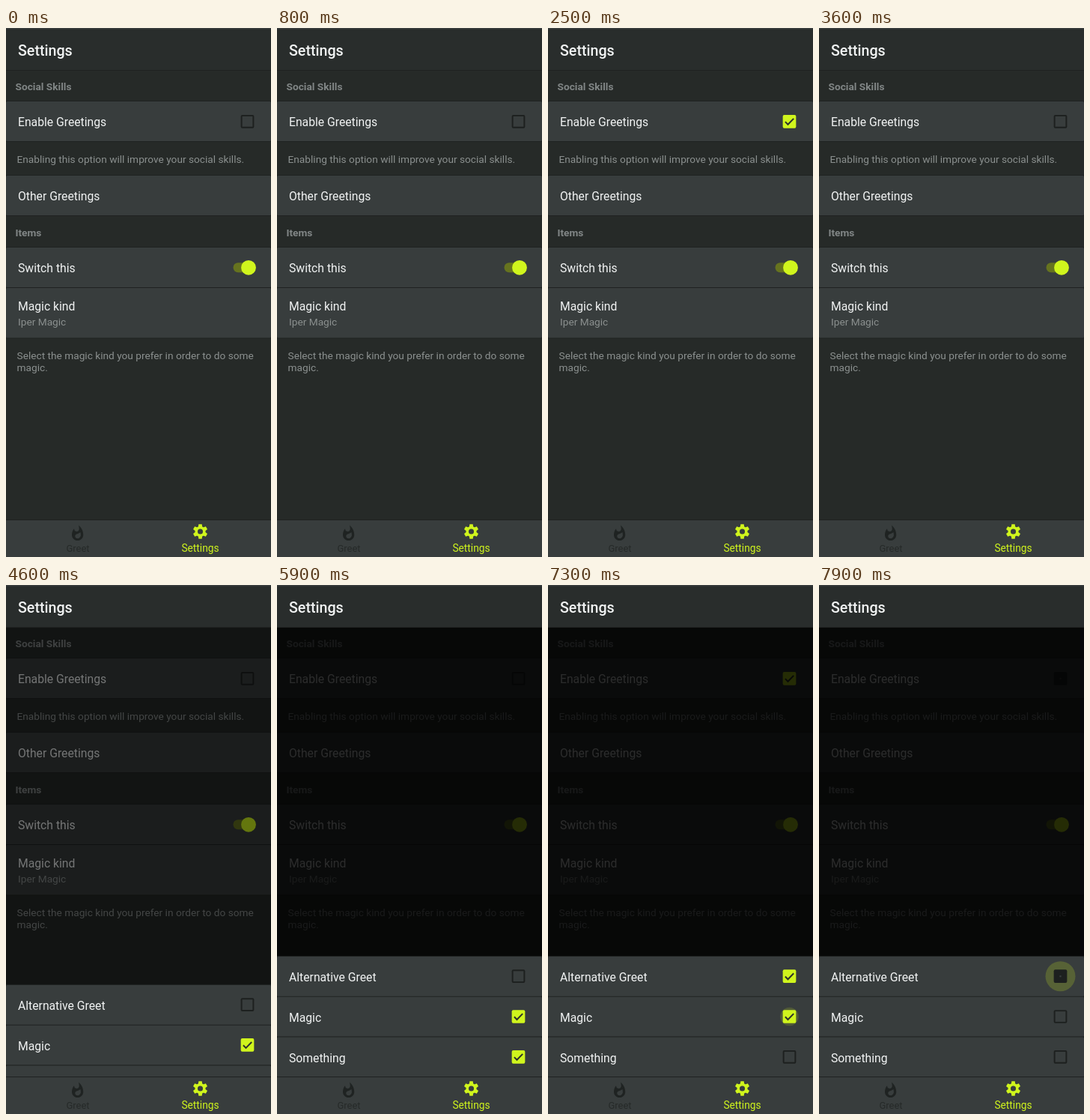
Recreate the animation shown at these times as an HTML page. Size 354 px wide and 706 px high, loop 8000 ms.

```html
<!DOCTYPE html>
<html lang="en">
<head>
<meta charset="utf-8">
<title>Settings</title>
<style>
  html, body { margin: 0; width: 100%; height: 100%; overflow: hidden; background: #262a28; }
  svg { display: block; width: 354px; height: 706px; }
  text { font: 15.73px Roboto, sans-serif; fill: #f1f3f3; }
  .title { font-size: 19.66px; font-weight: 500; }
  .section { font-size: 13.7px; font-weight: 700; fill: #818686; }
  .note { font-size: 13.7px; fill: #8b908f; }
  .tab { font-size: 13.76px; text-anchor: middle; }
  .row { fill: #383d3d; }
  .edge { fill: #1f2221; }
</style>
</head>
<body>
<svg viewBox="0 0 354 706">
  <rect width="354" height="706" fill="#262a28"/>
  <g id="page">
    <text class="section" x="12.5" y="82.5">Social Skills</text>
    <text class="note" x="14.5" y="180">Enabling this option will improve your social skills.</text>
    <text class="section" x="12.5" y="277.5">Items</text>
    <text class="note" x="14.5" y="442">Select the magic kind you prefer in order to do some</text>
    <text class="note" x="14.5" y="458">magic.</text>
  </g>
  <rect id="shade" y="57" width="354" height="600"/>
  <g id="sheet"></g>
  <rect width="354" height="57" fill="#292d2c"/>
  <rect width="354" height="1.5" fill="#3a3f3f"/>
  <rect class="edge" y="56" width="354" height="1"/>
  <text class="title" x="16" y="36.7">Settings</text>
  <rect class="row" y="657" width="354" height="49"/>
  <rect class="edge" y="656" width="354" height="1"/>
  <path transform="translate(84.2 663.2) scale(.95)" fill="#1f2322" fill-rule="evenodd"
    d="M13.5.67s.74 2.65.74 4.8c0 2.06-1.35 3.73-3.41 3.73-2.07 0-3.63-1.67-3.63-3.73l.03-.36C5.21 7.51 4 10.62 4 14c0 4.42 3.58 8 8 8s8-3.58 8-8C20 8.61 17.41 3.8 13.5.67zM11.71 19c-1.78 0-3.22-1.4-3.22-3.14 0-1.62 1.05-2.76 2.81-3.12 1.77-.36 3.6-1.21 4.62-2.58.39 1.29.59 2.65.59 4.04 0 2.65-2.15 4.8-4.8 4.8z"/>
  <text class="tab" x="96" y="699" style="fill:#262a29;font-size:13px">Greet</text>
  <g id="gear" transform="translate(259.5 672) scale(.983)" fill="#d0f51d"></g>
  <text class="tab" x="259.5" y="699" style="fill:#d0f51d">Settings</text>
</svg>
<script>
const LOOP = 8000, LIME = [208, 245, 29], DARK = [29, 32, 31];
const $ = id => document.getElementById(id);
const page = $('page'), sheet = $('sheet'), shade = $('shade');
const clamp = v => Math.max(0, Math.min(1, v));
const span = (t, from, length) => clamp((t - from) / length);
const easeOut = (p, power) => 1 - (1 - p) ** power;

function add(parent, tag, attrs, content) {
  const node = document.createElementNS('http://www.w3.org/2000/svg', tag);
  set(node, attrs);
  if (content) node.textContent = content;
  return parent.appendChild(node);
}
function set(node, attrs) {
  for (const key in attrs) node.setAttribute(key, attrs[key]);
}

function addRow(parent, y, height, label, detail) {
  add(parent, 'rect', { class: 'edge', y: y - 1, width: 354, height: height + 2 });
  add(parent, 'rect', { class: 'row', y, width: 354, height, rx: 1.5 });
  add(parent, 'text', { x: 16, y: y + (detail ? 30 : 33) }, label);
  if (detail) add(parent, 'text', { class: 'note', x: 16, y: y + 49.5 }, detail);
}

// flips: times at which the box toggles; a tap also shows a ripple
function addBox(parent, y, checked, flips, tapped = true) {
  const g = add(parent, 'g', { transform: `translate(322.5 ${y})` });
  const ripple = add(g, 'circle', { fill: '#d0f51d' });
  const frame = add(g, 'rect', { x: -8.85, y: -8.85, width: 17.7, height: 17.7, rx: 2 });
  const hole = add(g, 'rect', { class: 'row' });
  const tick = add(g, 'path', { d: 'M-5.6 .3L-2 4L5.7 -3.9', fill: 'none', stroke: '#2d322b', 'stroke-width': 2 });

  return t => {
    let on = checked, last = -1e4;
    for (const flip of flips) if (t >= flip) { on = !on; last = flip; }
    const p = span(t, last, 300), amount = on ? p : 1 - p;
    const tint = clamp((amount - .6) / .25), mark = clamp((amount - .65) / .35);
    const size = 13.8 * clamp((.58 - amount) / .58) ** .95;
    const mix = LIME.map((c, i) => Math.round(DARK[i] + (c - DARK[i]) * tint));
    frame.setAttribute('fill', `rgb(${mix})`);
    set(hole, { x: -size / 2, y: -size / 2, width: size, height: size });
    set(tick, { transform: `scale(${mark})`, opacity: mark });
    const next = flips.find(f => t >= f - 70 && t < f + 430);
    const age = tapped && next !== undefined ? t - next + 70 : -1;
    set(ripple, {
      r: 6 + 14 * easeOut(clamp(age / 200), 2),
      opacity: age < 0 ? 0 : .2 * clamp(age / 60) * (1 - span(age, 260, 200))
    });
  };
}

addRow(page, 98, 53, 'Enable Greetings');
addRow(page, 197, 53, 'Other Greetings');
addRow(page, 293, 53, 'Switch this');
addRow(page, 347, 66.5, 'Magic kind', 'Iper Magic');
add(page, 'rect', { x: 303.5, y: 313.2, width: 30, height: 13, rx: 6.5, fill: '#66731f' });
add(page, 'circle', { cx: 324, cy: 319.8, r: 9.9, fill: '#d0f51d' });

['Alternative Greet', 'Magic', 'Something'].forEach((label, i) => addRow(sheet, 496 + i * 53.8, 53, label));

for (let a = 0; a < 360; a += 60)
  add($('gear'), 'path', { d: 'M-2.2 -9.9H2.2L2.9 -5H-2.9Z', transform: `rotate(${a})`, 'stroke-linejoin': 'round' });
add($('gear'), 'circle', { r: 7.2 });
add($('gear'), 'circle', { class: 'row', r: 3.6 });

const boxes = [
  addBox(page, 124.8, false, [1250, 3180]),
  addBox(page, 124.8, false, [5980, 7750], false),
  addBox(sheet, 522.2, false, [5980, 7750]),
  addBox(sheet, 576, true, [7320]),
  addBox(sheet, 629.8, true, [6870])
];
// the first box answers taps, the second mirrors the top row of the sheet
const [own, linked] = page.querySelectorAll('g');

function draw(t) {
  const open = easeOut(span(t, 4510, 300), 4);
  sheet.setAttribute('transform', `translate(0 ${(1 - open) * 161})`);
  sheet.style.visibility = open ? 'visible' : 'hidden';
  shade.setAttribute('opacity', .82 * easeOut(span(t, 4510, 450), 4.4));
  own.style.display = t < 5000 ? '' : 'none';
  linked.style.display = t < 5000 ? 'none' : '';
  boxes.forEach(update => update(t));
}

const start = performance.now();
function tick() {
  draw((performance.now() - start) % LOOP);
  requestAnimationFrame(tick);
}
tick();
</script>
</body>
</html>
```
